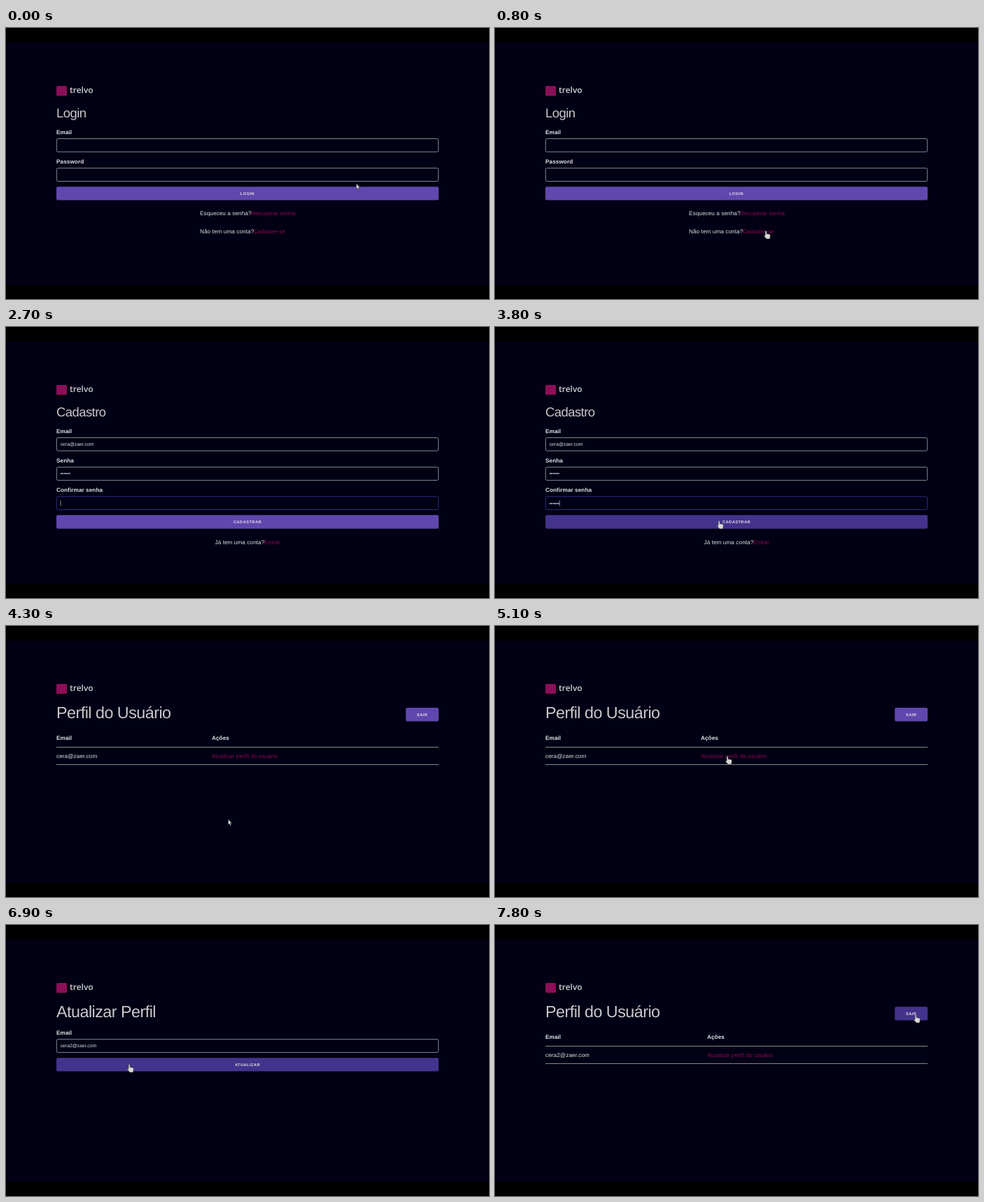
An HTML page that plays this animation: 690x388 px, repeating every 8000 ms.

```html
<!DOCTYPE html>
<html lang="pt-BR">
<head>
<meta charset="utf-8">
<title>Login</title>
<style>
  html, body { margin: 0; width: 100%; height: 100%; overflow: hidden; background: #000; }
  svg { display: block; width: 100%; height: 100%; }
  text { font: 8.18px "Liberation Sans", Arial, sans-serif; letter-spacing: .08px; fill: #e2e2e6; text-rendering: geometricPrecision; }
  .brand { font: 600 12px "Open Sans", sans-serif; letter-spacing: 0; fill: #d0d0d4; }
  .h1, .h2 { letter-spacing: -.51px; fill: #c9c9cb; }
  .h1 { font-size: 23.3px; }
  .h2 { font-size: 18.4px; }
  .bold { font-weight: bold; }
  .value { font-size: 6.8px; letter-spacing: 0; }
  .label { font-size: 5.6px; font-weight: bold; letter-spacing: .51px; text-anchor: middle; }
  .link { fill: #8e0955; }
</style>
</head>
<body>
<svg id="stage" viewBox="0 0 690 388"></svg>
<script>
const LOOP = 8000, STEP = 100, LEFT = 72, WIDTH = 546, ROW = 42.15, HEIGHT = 19.4;
const FIRST_MAIL = 'cera@zaer.com', NEW_MAIL = 'cera2@zaer.com';
const stage = document.getElementById('stage');
const ruler = document.createElement('canvas').getContext('2d');
ruler.font = '6.8px "Liberation Sans", Arial, sans-serif';

// Pointer stops: departure, arrival, place
const stops = [
  { from: 0, to: 200, x: 456, y: 282 },     // towards the links
  { from: 400, to: 700, x: 385, y: 290 },   // sign-up link
  { from: 1000, to: 1300, x: 345, y: 168 }, // email field
  { from: 2900, to: 3300, x: 318, y: 277 }, // sign-up button
  { from: 4400, to: 5000, x: 330, y: 186 }, // update link
  { from: 5300, to: 6000, x: 96, y: 176 },  // email field
  { from: 6500, to: 6900, x: 174, y: 199 }, // update button
  { from: 7200, to: 7700, x: 599, y: 128 }  // sign-out button
];
const progress = (t, from, to) => Math.min(1, Math.max(0, (t - from) / (to - from)));

function pointerAt(t) {
  let x = 501, y = 223;
  for (const s of stops) {
    const k = progress(t, s.from, s.to);
    x += (s.x - x) * k;
    y += (s.y - y) * k;
  }
  return { x, y };
}

const typed = (str, t, from, to) => str.slice(0, Math.floor(str.length * progress(t, from, to)));
const text = (x, y, str, cls = '') => `<text x="${x}" y="${y}" class="${cls}">${str}</text>`;
const rule = y => `<path d="M${LEFT} ${y}h${WIDTH}" stroke="#88888f"/>`;

const pointers = {
  none: '',
  arrow: 'M-.6-.3v8l1.8-1.6 1.3 2.9 1.3-.6-1.3-2.8h2.4z',
  hand: 'M1 1q1.2-1.4 2.1 0v3.5l4.1.8q1.3.3 1.2 1.7l-.7 5h-5l-3.4-4.3q.2-1.5 1.7-.5z'
};

function draw(t) {
  const { x: px, y: py } = pointerAt(t);
  let shape = 'arrow';

  function over(x, y, w, h, kind) {
    const hit = px >= x && px <= x + w && py >= y && py <= y + h;
    if (hit) shape = kind;
    return hit;
  }

  function button(x, y, w, str) {
    const fill = over(x, y, w, HEIGHT, 'hand') ? '#44338c' : '#6047ae';
    return `<rect x="${x}" y="${y}" width="${w}" height="${HEIGHT}" rx="2" fill="${fill}"/>` +
      text(x + w / 2, y + 11.8, str, 'label');
  }

  function link(x, y, w, str) {
    over(x, y - 8, w, 11, 'hand');
    return text(x, y, str, 'link');
  }

  // A caret index marks the focused field
  function field(y, { name, value = '', caret = -1, blink = false }) {
    const focus = caret >= 0;
    over(LEFT, y, WIDTH, HEIGHT, 'none');
    const end = 78 + ruler.measureText(value.slice(0, caret)).width;
    return text(LEFT, y - 6.3, name, 'bold') +
      `<rect x="${LEFT + .3}" y="${y + .3}" width="${WIDTH - .6}" height="${HEIGHT - .6}" rx="2" fill="none" stroke="${focus ? '#40349a' : '#a9a9b1'}" stroke-width=".8"/>` +
      text(77.7, y + 12, value, 'value') +
      (focus && !blink ? `<path d="M${end} ${y + 5.8}v8" stroke="#c8c8cc" stroke-width=".7"/>` : '');
  }

  const form = (top, rows, action) => rows.map((row, i) => field(top + ROW * i, row)).join('') +
    button(LEFT, top + ROW * rows.length - 15.3, WIDTH, action);

  const login = () => text(LEFT, 127.6, 'Login', 'h2') +
    form(158.2, [{ name: 'Email' }, { name: 'Password' }], 'LOGIN') +
    text(277, 268.2, 'Esqueceu a senha?') + link(350, 268.2, 63, 'Recuperar senha') +
    text(277, 294, 'Não tem uma conta?') + link(353.6, 294, 45, 'Cadastre-se');

  function signUp() {
    const focus = t >= 4000 ? -1 : t >= 2700 ? 2 : t >= 2000 ? 1 : t >= 1400 ? 0 : -1;
    const rows = [
      { name: 'Email', value: typed(FIRST_MAIL, t, 1400, 1600) },
      { name: 'Senha', value: typed('••••••', t, 2100, 2500) },
      { name: 'Confirmar senha', value: typed('••••••', t, 2800, 3100) }
    ];
    if (focus >= 0) {
      rows[focus].caret = rows[focus].value.length;
      rows[focus].blink = t >= 1800 && t < 2000;
    }
    return text(LEFT, 127.6, 'Cadastro', 'h2') + form(158.2, rows, 'CADASTRAR') +
      text(298.5, 310.7, 'Já tem uma conta?') + link(369, 310.7, 22, 'Entrar');
  }

  const profile = (mail, column) => text(LEFT, 131.9, 'Perfil do Usuário', 'h1') +
    button(571.2, 117, 46.8, 'SAIR') +
    text(LEFT, 163, 'Email', 'bold') + text(column, 163, 'Ações', 'bold') + rule(173.5) +
    text(LEFT, 188.8, mail) + link(column, 188.8, 94, 'Atualizar perfil do usuário') + rule(198.5);

  function update() {
    const edited = t >= 6400, focus = t >= 6200 && t < 6900;
    const row = { name: 'Email', value: edited ? NEW_MAIL : FIRST_MAIL, caret: focus ? 4 + edited : -1 };
    return text(LEFT, 131.9, 'Atualizar Perfil', 'h1') + form(163.3, [row], 'ATUALIZAR');
  }

  const page = t < 1000 ? login()
    : t < 4300 ? signUp()
    : t < 5300 ? profile(FIRST_MAIL, 294)
    : t < 7300 ? update()
    : profile(NEW_MAIL, 303);

  stage.innerHTML = '<rect y="21" width="690" height="347" fill="#010014"/>' +
    '<rect x="72" y="83" width="15" height="14" rx="1.5" fill="#8c0f57"/>' +
    text(91, 93.2, 'trelvo', 'brand') + page +
    `<path d="${pointers[shape]}" transform="translate(${px} ${py})" fill="#d8d8d8" stroke="#14141c" stroke-width=".5"/>`;
}

let shown = -1;
function tick(now) {
  const t = Math.floor(now % LOOP / STEP) * STEP;
  if (t !== shown) draw(shown = t);
  requestAnimationFrame(tick);
}
draw(0);
requestAnimationFrame(tick);
</script>
</body>
</html>
```
